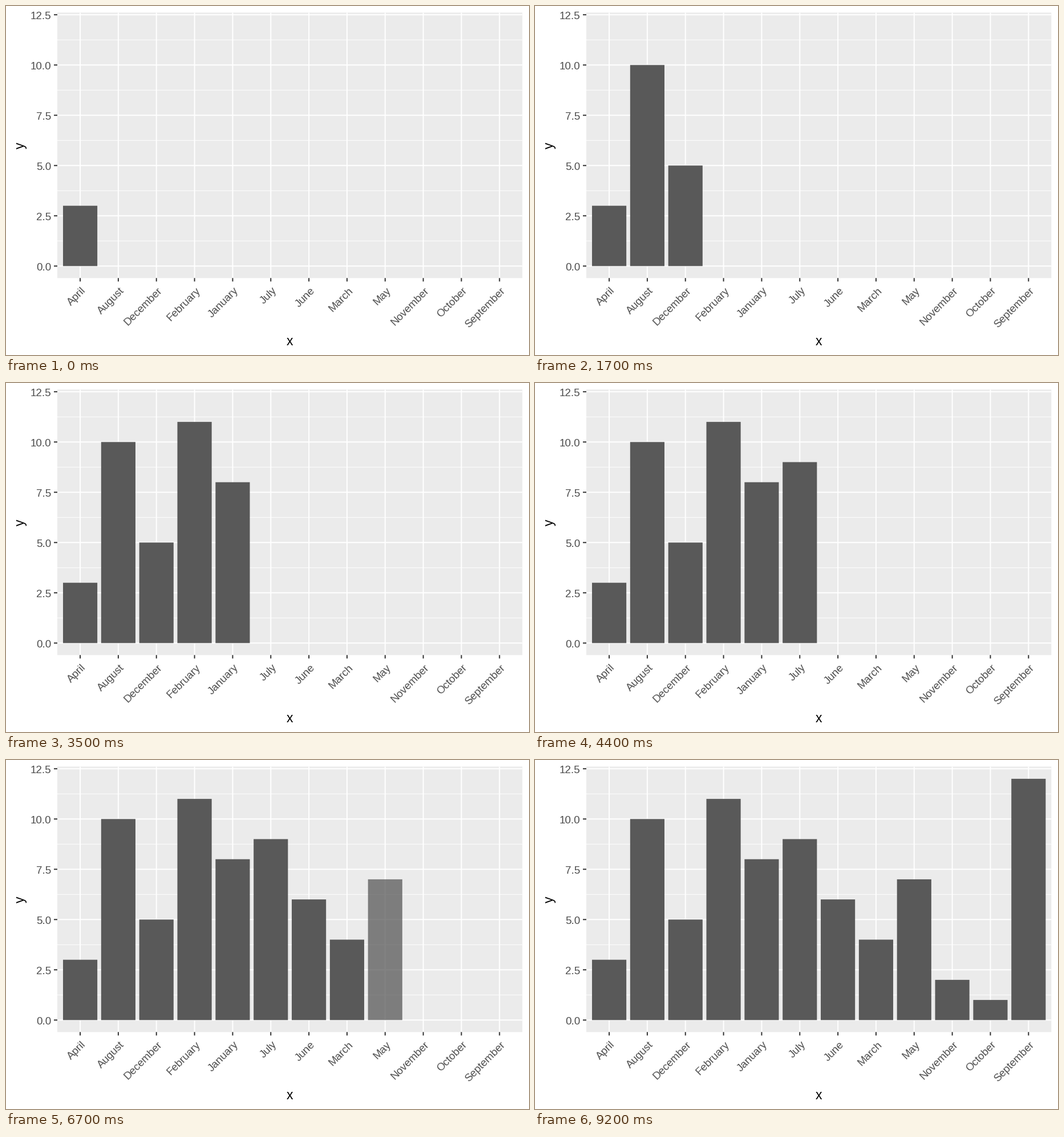
A matplotlib script that plays this animation: 917 by 611 pixels, repeating every 10000 ms.

```python
import matplotlib.pyplot as plt
from matplotlib.animation import FuncAnimation
from matplotlib.patches import Rectangle

W, H, DPI = 917, 611, 72  # at 72 dpi one point is one pixel
FRAMES, INTERVAL = 100, 100
FADE_STEPS = 4

LEFT, TOP, RIGHT, BOTTOM = 90, 11.5, 905.3, 476.3
ZERO_Y, UNIT_Y = 455.3, 35.2
FIRST_X, STEP_X = 130.06, 66.84
BAR_WIDTH = 0.9 * STEP_X
TICK = 6
FONT = "Liberation Sans"

VALUES = {"April": 3, "August": 10, "December": 5, "February": 11,
          "January": 8, "July": 9, "June": 6, "March": 4, "May": 7,
          "November": 2, "October": 1, "September": 12}

fig = plt.figure(figsize=(W / DPI, H / DPI), dpi=DPI, facecolor="white")
ax = fig.add_axes([0, 0, 1, 1])
ax.set_xlim(0, W)
ax.set_ylim(H, 0)
ax.axis("off")


def box(x0, y0, x1, y1, color, z):
    return ax.add_patch(Rectangle((x0, y0), x1 - x0, y1 - y0, facecolor=color,
                                  linewidth=0, snap=False, zorder=z))


def label(x, y, text, size, color, **kw):
    ax.text(x, y, text, fontsize=size, color=color, family=FONT,
            va="baseline", rotation_mode="anchor", **kw)


def hline(x0, x1, y, width, color):
    box(x0, y - width / 2, x1, y + width / 2, color, 1)


def vline(x, y0, y1, width, color):
    box(x - width / 2, y0, x + width / 2, y1, color, 1)


def row(value):
    return ZERO_Y - UNIT_Y * value


def column(k):
    return FIRST_X + STEP_X * k


def draw_axes():
    box(LEFT, TOP, RIGHT, BOTTOM, "#EBEBEB", 0)
    for i in range(5):
        hline(LEFT, RIGHT, row(1.25 + 2.5 * i), 1, "white")
    for i in range(6):
        value = 2.5 * i
        y = row(value)
        hline(LEFT, RIGHT, y, 2, "white")
        hline(LEFT - TICK, LEFT, y, 2, "#333333")
        label(79.7, round(y) + 8, f"{value:.1f}", 18.75, "#4D4D4D", ha="right")
    for k, month in enumerate(VALUES):
        x = column(k)
        vline(x, TOP, BOTTOM, 2, "white")
        vline(x, BOTTOM, BOTTOM + TICK, 2, "#333333")
        label(x + 11, 499, month, 18.75, "#4D4D4D", ha="right", rotation=45)
    label(497.5, 594, "x", 23, "black", ha="center")
    label(31.5, 244, "y", 23, "black", ha="center", rotation=90)


def make_bar(k, value):
    x = column(k)
    return box(x - BAR_WIDTH / 2, row(value), x + BAR_WIDTH / 2, row(0),
               "#595959", 2)


def fade_start(k):
    # the gap between bars shortens from nine frames to eight
    return 9 * k - 4 - max(0, k - 5)


def opacity(k, frame):
    if k == 0:
        return 1.0
    return min(1.0, max(0.0, (frame - fade_start(k) + 1) / FADE_STEPS))


draw_axes()
bars = [make_bar(k, v) for k, v in enumerate(VALUES.values())]


def update(frame):
    for k, bar in enumerate(bars):
        bar.set_alpha(opacity(k, frame))
    return bars


anim = FuncAnimation(fig, update, frames=FRAMES, interval=INTERVAL,
                     repeat=True, repeat_delay=0, blit=False)
plt.show()
```
